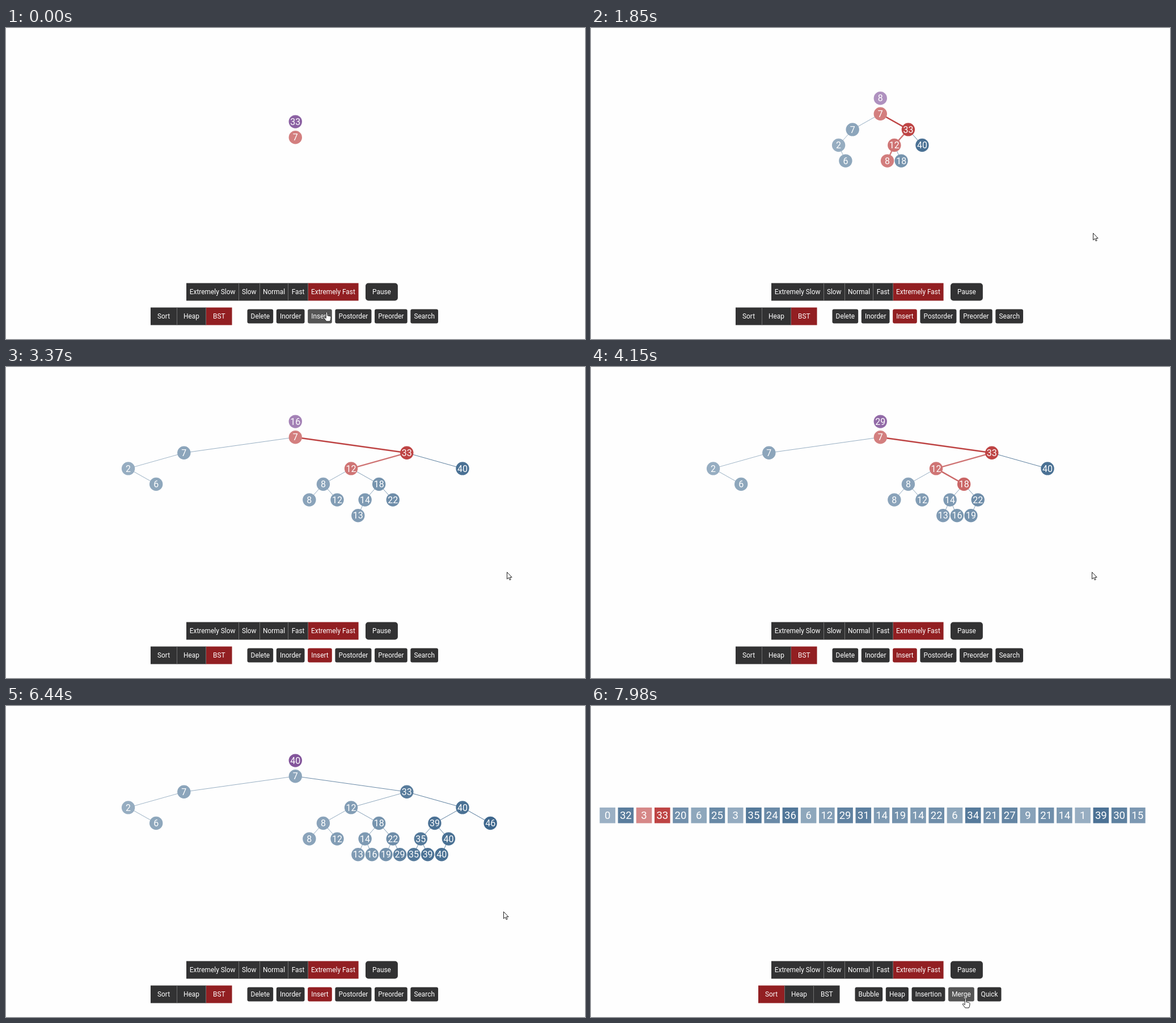
Recreate the animation shown at these times as an HTML page with a canvas. Size 1021 px wide and 548 px high, loop 8 s.

```html
<!DOCTYPE html>
<html lang="en">
<head>
<meta charset="utf-8">
<title>Binary search tree</title>
<style>
html, body { margin: 0; width: 100%; height: 100%; overflow: hidden; background: #fefefe; }
canvas { display: block; }
</style>
</head>
<body>
<canvas id="stage" width="1021" height="548"></canvas>
<script>
const ctx = document.getElementById('stage').getContext('2d');
const LOOP = 8000, CUT = 7980, BEAT = 109.6, STEPS_PER_BEAT = 2.15;
const MAX_ROWS = 6, CX = 510.3, CY = 192.7, ROW = 27.6, SLOT = 12.28, R = 11.7;
const BLUE = [54, 97, 136], RED = [177, 30, 30], PURPLE = [117, 66, 144];
const LABEL_SIZE = 11.9;

// Larger values get stronger colours.
function shade(base, v) {
  const a = 0.5 + v / 100;
  return `rgb(${base.map(c => Math.round(255 - (255 - c) * a))})`;
}

// ---- Insertion steps: idle, one per visited node, then the new node ----
const values = [33, 7, 40, 2, 6, 12, 18, 8, 8, 12, 14, 22, 13, 16, 19, 29,
  39, 46, 35, 35, 39, 40, 40, 40, 43, 48, 42, 45];
const nodes = [{ v: 7, u: 0, depth: 0 }];
const steps = [];

function insert(v) {
  const path = [];
  const record = () => steps.push({ v, count: nodes.length, path: [...path] });
  record();
  let node = nodes[0], parent, side;
  while (node) {
    path.push(node);
    record();
    parent = node;
    side = v <= node.v ? 'left' : 'right';
    node = node[side];
  }
  const depth = parent.depth + 1;
  if (depth >= MAX_ROWS) return;
  const u = parent.u + (side === 'left' ? -1 : 1) / 2 ** depth;
  node = parent[side] = { v, u, depth, parent };
  nodes.push(node);
  path.push(node);
  record();
}
values.forEach(insert);

// ---- Drawing ----
function setFont(size) {
  ctx.font = `${size}px Roboto, "Open Sans", sans-serif`;
}

function text(s, x, y, size) {
  setFont(size);
  ctx.fillStyle = '#fff';
  ctx.textAlign = 'center';
  ctx.fillText(s, x, y + size * 0.36);
}

function disc(v, x, y, base) {
  ctx.fillStyle = shade(base, v);
  ctx.beginPath();
  ctx.arc(x, y, R, 0, 7);
  ctx.fill();
  text(v, x, y, 16);
}

function drawTree({ v, count, path }) {
  const shown = nodes.slice(0, count);
  const rows = 1 + Math.max(...shown.map(n => n.depth));
  const top = CY - ROW * (rows - 1) / 2;
  const px = n => CX + n.u * SLOT * 2 ** (rows - 1);
  const py = n => top + n.depth * ROW;
  const tone = n => path.includes(n) ? RED : BLUE;
  for (const n of shown.slice(1)) {
    ctx.strokeStyle = shade(tone(n), n.v);
    ctx.lineWidth = path.includes(n) ? 2.4 : 0.9;
    ctx.beginPath();
    ctx.moveTo(px(n.parent), py(n.parent));
    ctx.lineTo(px(n), py(n));
    ctx.stroke();
  }
  for (const n of shown) disc(n.v, px(n), py(n), tone(n));
  disc(v, CX, top - ROW, PURPLE);
}

const list = [0, 32, 3, 33, 20, 6, 25, 3, 35, 24, 36, 6, 12, 29, 31, 14, 19, 14, 22, 6,
  34, 21, 27, 9, 21, 14, 1, 39, 30, 15];

function drawList() {
  list.forEach((v, i) => {
    const x = 15.3 + 32.23 * i;
    ctx.fillStyle = shade(i === 2 || i === 3 ? RED : BLUE, v);
    ctx.fillRect(x, CY - ROW / 2, ROW, ROW);
    text(v, x + ROW / 2, CY, 18.5);
  });
}

// A row of buttons, each as wide as its label; without a gap they are joined.
// Returns whether the pointer is over one of them.
function buttons(labels, x, y, h, { pad, gap = 0, radius = 0, active }, [mx, my]) {
  let hit = false;
  labels.split(',').forEach((label, i) => {
    setFont(LABEL_SIZE);
    const w = ctx.measureText(label).width + pad;
    const over = mx >= x && mx <= x + w && my >= y && my <= y + h;
    hit = hit || over;
    ctx.fillStyle = over ? '#555' : label === active ? '#921f22' : '#323233';
    ctx.beginPath();
    ctx.roundRect(x, y, w, h, radius);
    ctx.fill();
    if (i && !gap) {
      ctx.fillStyle = '#707070';
      ctx.fillRect(Math.floor(x), y, 1, h);
    }
    text(label, x + w / 2, y + h / 2, LABEL_SIZE);
    x += w + gap;
  });
  return hit;
}

function drawControls(sorting, mouse) {
  const shift = sorting ? 40 : 0;
  const tools = sorting ? 'Bubble,Heap,Insertion,Merge,Quick'
    : 'Delete,Inorder,Insert,Postorder,Preorder,Search';
  const hits = [
    buttons('Extremely Slow,Slow,Normal,Fast,Extremely Fast', 318, 449.5, 31,
      { pad: 11.5, active: 'Extremely Fast' }, mouse),
    buttons('Pause', 634, 449.5, 31, { pad: 24, radius: 5 }, mouse),
    buttons('Sort,Heap,BST', 255 + shift, 492.5, 31,
      { pad: 24, active: sorting ? 'Sort' : 'BST' }, mouse),
    buttons(tools, 425.5 + shift, 495.5, 25,
      { pad: 12.2, gap: 5.6, radius: 3, active: 'Insert' }, mouse)
  ];
  return hits.includes(true);
}

// ---- Pointer ----
const route = [[0, 565, 500], [870, 885, 361], [4370, 883, 361], [4800, 877, 362]];
const arrow = new Path2D('M0 0V12.2L2.8 9.6 4.7 13.8 6.6 13 4.8 9H8.6Z');
const hand = new Path2D('M-1.3 9V1.4a1.3 1.3 0 0 1 2.6 0V6.2l4.8 1q1.6.4 1.5 2l-.5 4.2-1.3 3H-.6L-5 10.6q-.5-1.7 1.2-1.6L-1.3 11Z');

function pointerAt(t) {
  const i = route.findIndex(p => p[0] > t);
  if (i < 0) return route.at(-1).slice(1);
  const [t0, x0, y0] = route[i - 1], [t1, x1, y1] = route[i];
  const p = (t - t0) / (t1 - t0), k = p * p * (3 - 2 * p);
  return [x0 + (x1 - x0) * k, y0 + (y1 - y0) * k].map(Math.round);
}

function drawPointer([x, y], shape) {
  ctx.save();
  ctx.translate(x + 0.5, y + 0.5);
  ctx.lineWidth = 1;
  ctx.fillStyle = '#fff';
  ctx.strokeStyle = '#222';
  ctx.fill(shape);
  ctx.stroke(shape);
  ctx.restore();
}

function draw(t) {
  ctx.fillStyle = '#fefefe';
  ctx.fillRect(0, 0, 1021, 548);
  const sorting = t >= CUT;
  const beat = Math.floor((t + 32) / BEAT);
  const mouse = sorting ? [660, 515] : pointerAt(beat * BEAT);
  if (sorting) drawList();
  else drawTree(steps[1 + Math.floor(beat * STEPS_PER_BEAT + 0.27)]);
  const over = drawControls(sorting, mouse);
  drawPointer(mouse, over ? hand : arrow);
}

const start = performance.now();
function tick() {
  draw((performance.now() - start) % LOOP);
  requestAnimationFrame(tick);
}
tick();
</script>
</body>
</html>
```
